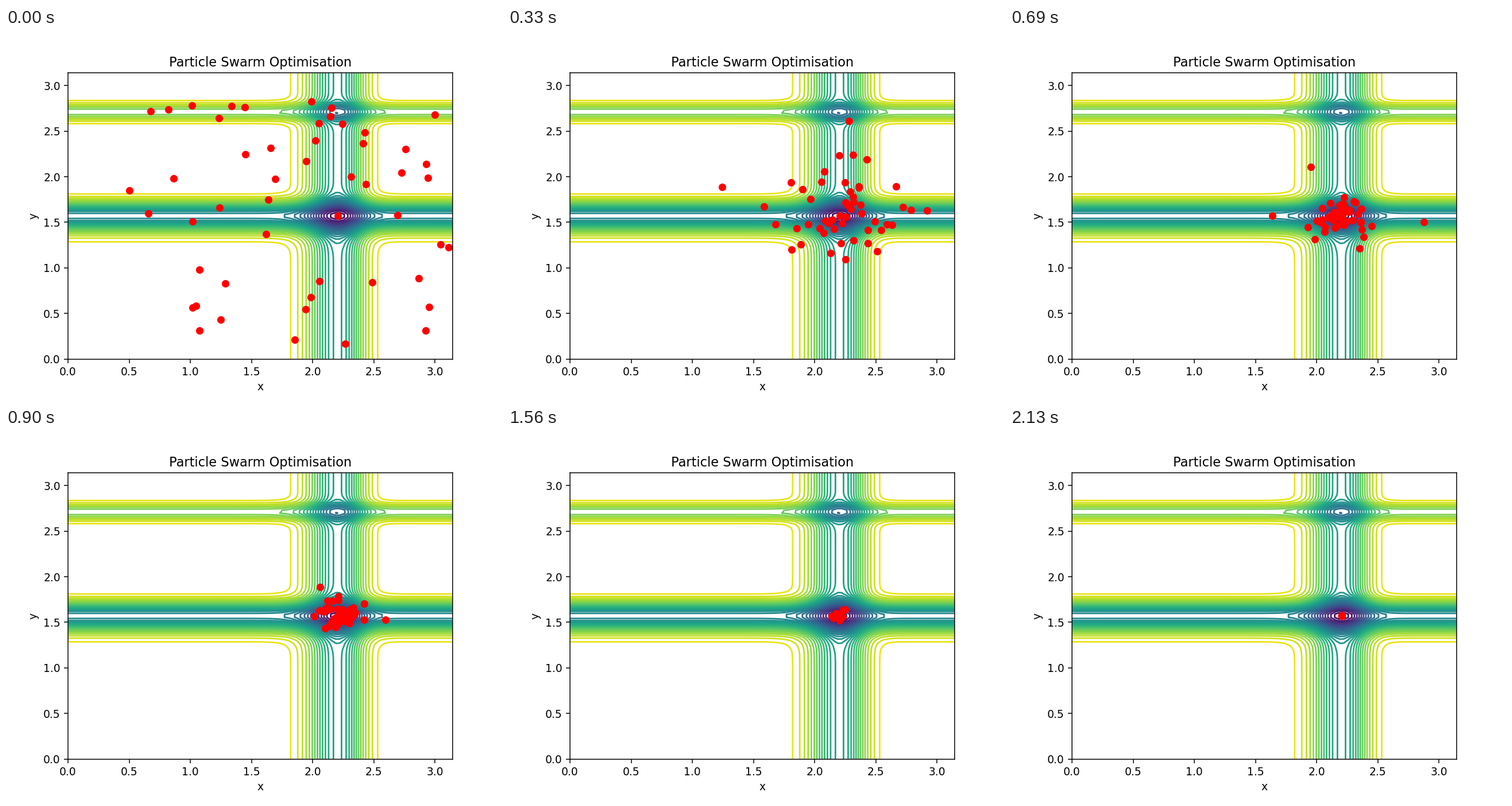
Recreate the animation shown at these times as a matplotlib script. Size 864 px wide and 648 px high, loop 3.05 s.

```python
import numpy as np
import matplotlib.pyplot as plt
from matplotlib.animation import FuncAnimation

W, H, DPI = 864, 648, 135
STEP_MS, TICK_MS, LOOP_MS = 30, 10, 3050
LAST = 71
COUNT = 47
BEST = np.array([577.6, 327.3])
rng = np.random.default_rng(11)
steps = np.arange(LAST + 1)


def swarm_path():
    """Particles swing around the optimum while each one's reach decays."""
    u, v = rng.random((2, COUNT))
    start = np.stack([215 + 565 * u**0.8, 128 + 424 * v], axis=1)
    offset = start - BEST
    side = rng.normal(0, [85, 65], (COUNT, 2))
    omega = 2 * np.pi / rng.uniform(9, 20, (COUNT, 2))
    rate = np.clip(rng.normal(0.068, 0.018, (COUNT, 1)), 0.042, 0.12) * [1, 1.1]

    t = steps[:, None, None]
    swing = offset * np.cos(omega * t) + side * np.sin(omega * t)
    fade = 1 - (t / LAST) ** 4
    return BEST + swing * np.exp(-rate * t) * fade


def wander(*points):
    """A straggler passing through a few points on its way to the optimum."""
    x, y = np.array([*points, BEST]).T
    at = [0, 7, 15, 23, 38, 52]
    return np.stack([np.interp(steps, at, x), np.interp(steps, at, y)], axis=1)


stragglers = [
    wander((215, 283), (327, 310), (419, 244), (457, 327), (628, 330)),
    wander((731, 527), (749, 312), (711, 324), (721, 338), (593, 329)),
    wander((532, 128), (565, 124), (622, 200), (524, 242), (573, 316)),
    np.tile(BEST, (LAST + 1, 1)),
]


def to_data(p):
    x = (p[..., 0] - 0.125 * W) * np.pi / (0.775 * W)
    y = (0.89 * H - p[..., 1]) * np.pi / (0.77 * H)
    return x, y


path = np.concatenate([swarm_path(), np.stack(stragglers, axis=1)], axis=1)
xs, ys = to_data(path)

# Michalewicz function in two dimensions
grid = np.linspace(0, np.pi, 100)
X, Y = np.meshgrid(grid, grid)
Z = -np.sin(X) * np.sin(X**2 / np.pi) ** 20 - np.sin(Y) * np.sin(2 * Y**2 / np.pi) ** 20

fig, ax = plt.subplots(figsize=(W / DPI, H / DPI), dpi=DPI)
ax.contour(X, Y, Z, 30)
dots, = ax.plot(xs[0], ys[0], "ro")
ax.set(xlim=(0, np.pi), ylim=(0, np.pi), xlabel="x", ylabel="y",
       title="Particle Swarm Optimisation")


def draw(n):
    k = min(n * TICK_MS // STEP_MS, LAST)
    dots.set_data(xs[k], ys[k])
    return dots,


anim = FuncAnimation(fig, draw, frames=LOOP_MS // TICK_MS, interval=TICK_MS,
                     repeat=True, repeat_delay=0, blit=True)
plt.show()
```
